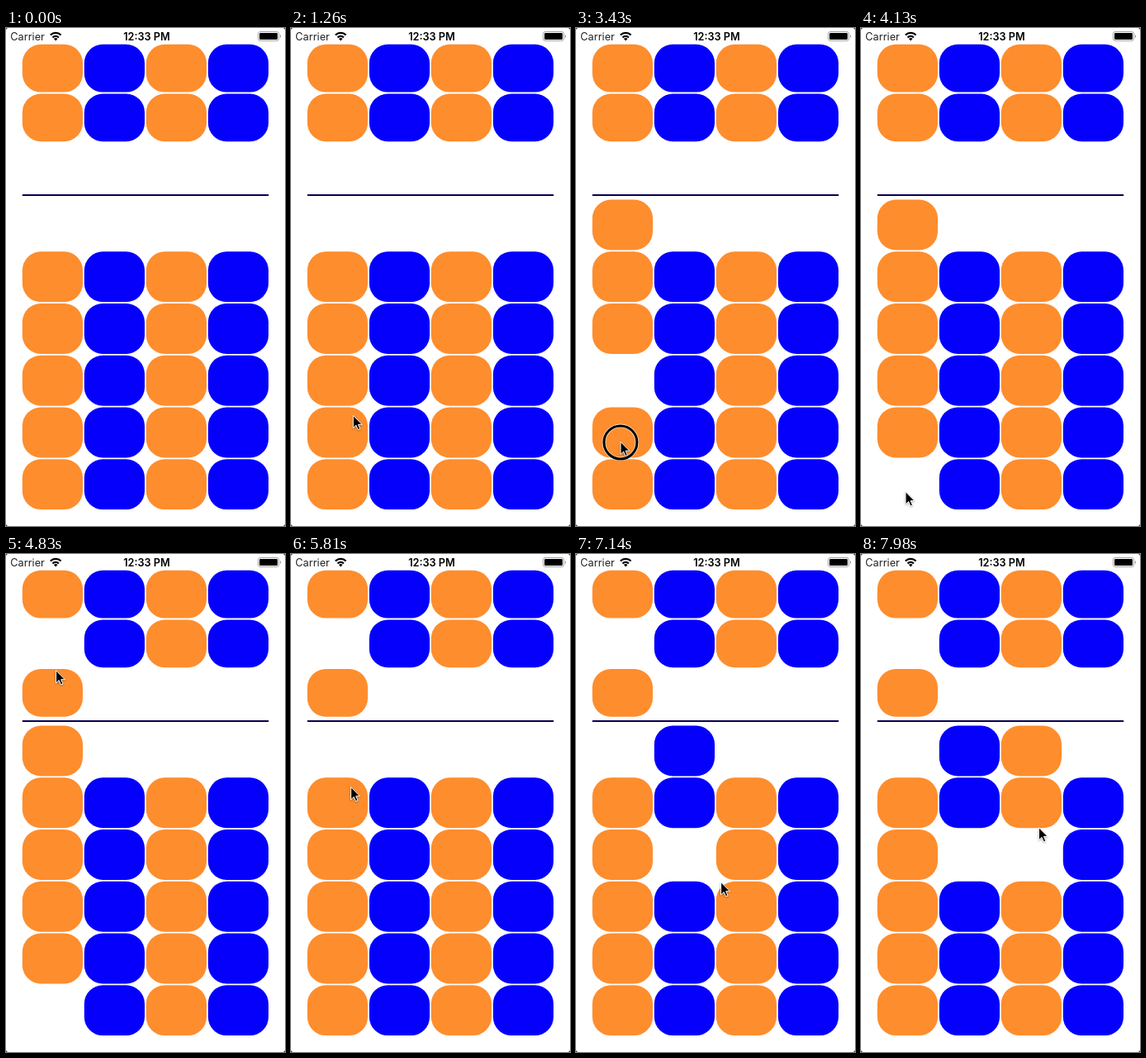
Animation of 338 by 602 pixels, one loop 8 s. Source, as an HTML page:

```html
<!DOCTYPE html>
<html lang="en">
<head>
<meta charset="utf-8">
<title>Abacus</title>
<style>
  html, body { margin: 0; width: 100%; height: 100%; overflow: hidden; background: #fff; }
  svg { display: block; width: 338px; height: 602px; }
  text { font: 12.7px Inter, Roboto, sans-serif; }
  .clock { font-weight: 600; text-anchor: middle; }
  .arrow { filter: drop-shadow(0 1px 1px #0005); }
</style>
</head>
<body>
<svg viewBox="0 0 338 602">
  <path d="M0 0H2L0 2ZM338 0H336L338 2ZM0 602H2L0 600ZM338 602H336L338 600Z" fill="#444"/>
  <text x="5.3" y="14.5" fill="#222">Carrier</text>
  <text class="clock" x="170.4" y="14.5">12:33 PM</text>
  <g fill="none" stroke="#000" stroke-width="2.2">
    <path d="M53.8 8.6A9 9 0 0 1 66.6 8.6"/>
    <path d="M56.5 11.4A5.2 5.2 0 0 1 63.9 11.4"/>
  </g>
  <path d="M60.2 15.4L57.9 13A3.3 3.3 0 0 1 62.5 13Z"/>
  <rect x="305.5" y="4.5" width="25" height="11" rx="2.5" fill="none" stroke="#999" stroke-width=".9"/>
  <rect x="307" y="6" width="22" height="8" rx="1.3"/>
  <path d="M332 8Q334.2 10 332 12Z" fill="#888"/>
  <g id="beads"></g>
  <rect x="19.8" y="201" width="298.4" height="2" fill="#0a0050"/>
  <g id="pointer">
    <g id="ring" fill="none">
      <circle cx=".5" cy="1.5" r="20" stroke="#fff" stroke-width="4.6" stroke-opacity=".7"/>
      <circle cx=".5" cy="1.5" r="20" stroke="#000" stroke-width="3"/>
    </g>
    <path class="arrow" d="M.6 .8V16L4.2 12.6L6.5 18L9 17L6.7 11.7H11.4Z" stroke="#fff" stroke-linejoin="round"/>
  </g>
</svg>
<script>
const LOOP = 8000, PRESS = 140;
const LEFT = 19.8, WIDTH = 73.2, SPACING = 1.8, RADIUS = 22.5;
const COLORS = ['#fe8d2d', '#0500fc'];
const $ = id => document.getElementById(id);

// A deck is a stack of equal slots, one of which is empty in each column.
function makeDeck(top, bottom, slots, empty) {
  const pitch = (bottom - top + SPACING) / slots;
  return { slots, empty, height: pitch - SPACING, y: slot => top + pitch * slot };
}
const upper = makeDeck(19.85, 196.75, 3, 2);
const lower = makeDeck(207.6, 582.1, 6, 0);
const columnX = col => LEFT + col * (WIDTH + SPACING);

// Pressing a bead shifts its stack, so the pressed slot becomes the empty one.
const tap = (at, deck, col, slot) => ({
  at, deck, col, slot,
  leave: at + PRESS,
  x: columnX(col) + WIDTH / 2 - 3,
  y: deck.y(slot) + deck.height / 2 + 10.5
});
const pass = (at, x, y) => ({ at, leave: at, x, y });

const path = [
  pass(250, 170, 606),
  tap(1640, lower, 0, 3),
  pass(2380, 84, 367),
  tap(3390, lower, 0, 4),
  tap(3970, lower, 0, 5),
  tap(4600, upper, 0, 1),
  pass(4830, 60, 140),
  tap(5420, lower, 0, 0),
  pass(5810, 72, 281),
  tap(6500, lower, 1, 2),
  pass(7140, 175, 396),
  tap(7630, lower, 2, 2),
  pass(LOOP, 215, 329)
];
const taps = path.filter(stop => stop.deck);

const beads = [];
for (const deck of [upper, lower]) {
  for (let col = 0; col < 4; col++) {
    for (let i = 0; i < deck.slots - 1; i++) {
      const el = document.createElementNS('http://www.w3.org/2000/svg', 'rect');
      const attrs = { x: columnX(col), width: WIDTH, height: deck.height, rx: RADIUS, fill: COLORS[col % 2] };
      for (const name in attrs) el.setAttribute(name, attrs[name]);
      $('beads').append(el);
      beads.push({ el, deck, col, i });
    }
  }
}

const smooth = p => p * p * (3 - 2 * p);

function pointerAt(t) {
  const next = path.findIndex(stop => stop.at > t);
  const a = path[next - 1], b = path[next];
  const e = smooth(Math.max(0, (t - a.leave) / (b.at - a.leave)));
  return [a.x + (b.x - a.x) * e, a.y + (b.y - a.y) * e];
}

function show(id, visible) {
  $(id).style.display = visible ? '' : 'none';
}

function draw() {
  const t = performance.now() % LOOP;
  const done = taps.filter(stop => t >= stop.leave);
  for (const { el, deck, col, i } of beads) {
    const last = done.filter(stop => stop.deck === deck && stop.col === col).pop();
    const empty = last ? last.slot : deck.empty;
    el.setAttribute('y', deck.y(i < empty ? i : i + 1));
  }
  const visible = t >= path[0].at;
  show('pointer', visible);
  show('ring', taps.some(stop => t >= stop.at && t < stop.leave));
  if (visible) $('pointer').setAttribute('transform', `translate(${pointerAt(t)})`);
  requestAnimationFrame(draw);
}
draw();
</script>
</body>
</html>
```
